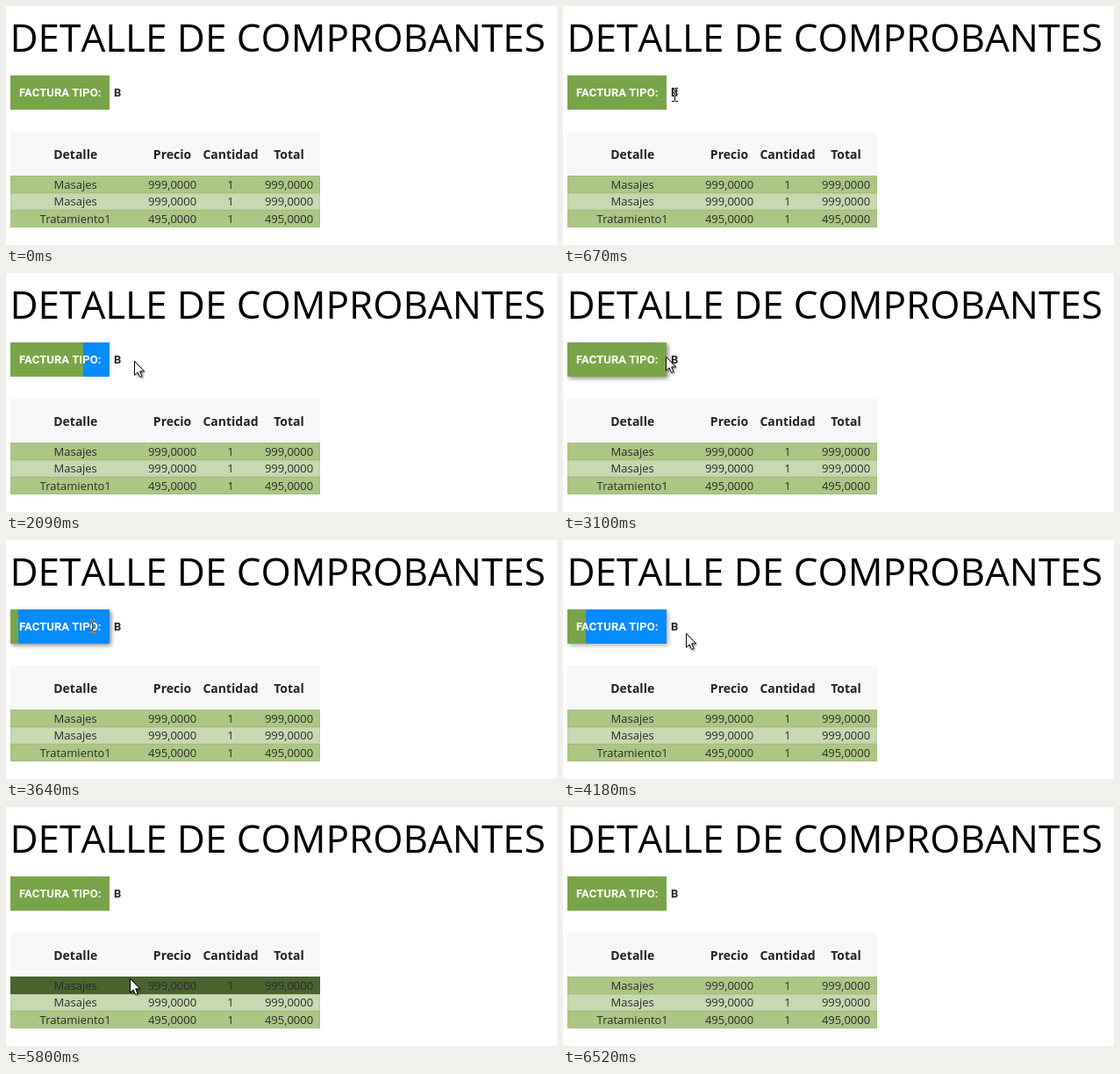
Animation, 628 px wide and 272 px high, one loop 7.82 s. Source, as an HTML page:

```html
<!DOCTYPE html>
<html lang="es">
<head>
<meta charset="utf-8">
<title>Detalle de comprobantes</title>
<style>
  html, body { margin: 0; width: 100%; height: 100%; overflow: hidden; background: #fff; }
  svg { display: block; }
  text { font-family: "Open Sans", sans-serif; font-size: 13px; fill: #2a2a2a; }
  .title { font-size: 44px; fill: #000; font-kerning: none; }
  .label { font-family: Roboto, sans-serif; font-weight: 700; letter-spacing: .1px; }
  .head { font-size: 14px; font-weight: 700; fill: #222; }
  .mid { text-anchor: middle; }
  #ibeam { mix-blend-mode: difference; }
</style>
</head>
<body>
<svg width="628" height="272" viewBox="0 0 628 272">
  <defs>
    <filter id="soft" x="-20%" y="-40%" width="140%" height="180%"><feGaussianBlur stdDeviation="2.5"/></filter>
    <filter id="faint" x="-50%" y="-50%" width="200%" height="200%"><feGaussianBlur stdDeviation="1"/></filter>
    <path id="arrowShape" d="M.5 .5V16.3L4.1 12.9 6.6 18.6 9.1 17.5 6.7 11.9H11.7Z"/>
  </defs>
  <rect width="628" height="272" fill="#fff"/>
  <text class="title" x="4.5" y="52">DETALLE DE COMPROBANTES</text>

  <rect id="shadow" x="7" y="81" width="113" height="39" fill="#000" filter="url(#soft)"/>
  <rect x="5" y="79" width="113" height="39" fill="#7aa449"/>
  <rect id="blue" y="79" height="39" fill="#048bfc"/>
  <text class="label" x="15" y="103" style="fill:#fff">FACTURA TIPO:</text>
  <text class="label" x="123" y="103" style="fill:#222">B</text>

  <rect x="5" y="143" width="353" height="50" fill="#f7f7f7"/>
  <g id="table"></g>

  <g id="arrow">
    <use href="#arrowShape" x="2" y="2" opacity=".4" filter="url(#faint)"/>
    <use href="#arrowShape" fill="#fff" stroke="#000"/>
  </g>
  <path id="ibeam" d="M-3 -8H0V-7H1V-8H4V-7H1V7H4V8H1V7H0V8H-3V7H0V-7H-3Z" fill="#fff"/>
</svg>
<script>
const LOOP = 7820, START = 160, STEP = 30;
const SLIDE = 800, FADE = 400, LAG = 100;
const ROWS_TOP = 193, ROW_HEIGHT = 59 / 3;
const el = id => document.getElementById(id);
const clamp = v => Math.min(1, Math.max(0, v));
const mix = (a, b, k) => a + (b - a) * k;

function add(tag, attrs, text) {
  const node = document.createElementNS("http://www.w3.org/2000/svg", tag);
  for (const key in attrs) node.setAttribute(key, attrs[key]);
  if (text) node.textContent = text;
  return el("table").appendChild(node);
}

function addCells(cells, y, cls) {
  const centres = [79.2, 189.5, 256, 322.5];
  cells.forEach((cell, i) => add("text", { x: centres[i], y, class: "mid " + cls }, cell));
}

function addRow([name, price], i) {
  const top = Math.round(ROWS_TOP + i * ROW_HEIGHT);
  const bottom = Math.round(ROWS_TOP + (i + 1) * ROW_HEIGHT);
  const height = bottom - top;
  const fill = i % 2 ? "#c8d8b0" : "#acc685";
  const rect = add("rect", { x: 5, y: top, width: 353, height });
  add("rect", {
    x: 5.5, y: top + .5, width: 352, height: height - 1,
    fill: "none", stroke: "#000", opacity: .05
  });
  addCells([name, price, "1", price], bottom - 5, "");
  return { top, bottom, fill, rect };
}

addCells(["Detalle", "Precio", "Cantidad", "Total"], 174, "head");
const rows = [
  ["Masajes", "999,0000"],
  ["Masajes", "999,0000"],
  ["Tratamiento1", "495,0000"]
].map(addRow);

// Turning points of the pointer: time, x, y
const route = [
  [160, 622, 104], [680, 117, 101], [1210, 97, 94], [1730, 120, 97],
  [2000, 148, 101], [2600, 130, 95], [2830, 130, 95], [2930, 178, 104],
  [3100, 117, 95], [3600, 96, 97], [4060, 118, 103], [4300, 162, 109],
  [5050, 125, 223], [5300, 130, 258], [5850, 142, 189], [6500, 134, 275]
];
const hovers = [[680, 1730], [3100, 4060]];

function pointer(t) {
  const i = route.findIndex(p => p[0] > t);
  if (t < START || i < 0) return [660, 300];
  const [t0, x0, y0] = route[i - 1], [t1, x1, y1] = route[i];
  const k = (t - t0) / (t1 - t0);
  return [mix(x0, x1, k), mix(y0, y1, k)];
}

// Same curve as the CSS "ease" keyword
function ease(x) {
  const curve = (s, p, q) => 3 * s * (1 - s) ** 2 * p + 3 * s * s * (1 - s) * q + s ** 3;
  let lo = 0, hi = 1;
  for (let i = 0; i < 24; i++) {
    const s = (lo + hi) / 2;
    if (curve(s, 0.25, 0.25) < x) lo = s; else hi = s;
  }
  return curve(lo, 0.1, 1);
}

function drawButton(t) {
  const [enter, leave] = hovers.filter(h => t >= h[0]).pop() || [Infinity, -Infinity];
  const slide = ease(clamp((t - enter) / SLIDE)) - ease(clamp((t - leave) / SLIDE));
  const width = Math.max(0, Math.round(112.4 * slide));
  el("blue").setAttribute("x", 118 - width);
  el("blue").setAttribute("width", width);
  el("shadow").setAttribute("opacity", 0.45 * (1 - clamp((t - leave) / FADE)));
}

function drawRows(t) {
  const y = pointer(t - LAG)[1];
  for (const row of rows) {
    const over = y >= row.top && y < row.bottom;
    row.rect.setAttribute("fill", over ? "#4a632f" : row.fill);
  }
}

function drawPointer(t) {
  const [x, y] = pointer(t).map(Math.round);
  const overText = y > 89 && y < 108 && ((x >= 15 && x < 109) || (x >= 122 && x < 133));
  const show = (id, on) => {
    el(id).setAttribute("transform", `translate(${x} ${y})`);
    el(id).setAttribute("visibility", on ? "visible" : "hidden");
  };
  show("arrow", !overText);
  show("ibeam", overText);
}

function draw(now) {
  const time = now % LOOP;
  const t = time < START ? 0 : START + Math.floor((time - START) / STEP) * STEP;
  drawButton(t);
  drawRows(t);
  drawPointer(t);
}

const begin = performance.now();
function tick() {
  draw(performance.now() - begin);
  requestAnimationFrame(tick);
}
tick();
</script>
</body>
</html>
```
